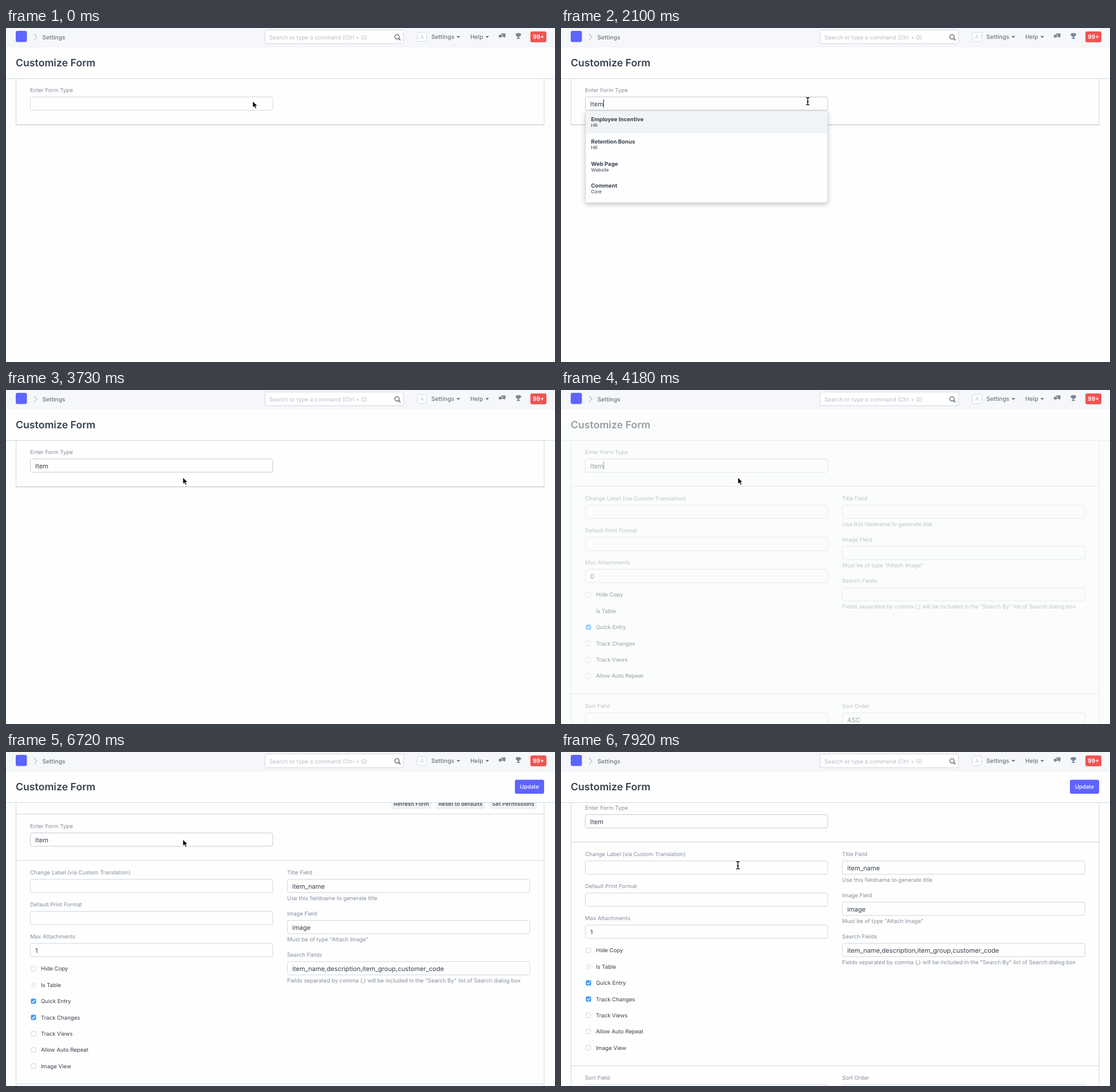
Animation of 959x584 px, one loop 8000 ms. Source, as an HTML page:

```html
<!DOCTYPE html>
<html lang="en">
<head>
<meta charset="utf-8">
<title>Customize Form</title>
<style>
  html, body { margin: 0; width: 100%; height: 100%; overflow: hidden; background: #fefefe; }
  svg { display: block; width: 959px; height: 584px; }
  text { font-family: Inter, sans-serif; white-space: pre; text-rendering: geometricPrecision; }
  .menu { filter: drop-shadow(0 3px 4px rgba(0, 0, 0, .2)); }
</style>
</head>
<body>
<svg id="stage" viewBox="0 0 959 584"></svg>
<script>
const LOOP = 8000, STEP = 146;
const FOCUS = 150, OPEN_MENU = 1200, TYPE = 1350, RESULTS = 2700, PICK = 3730;
const FREEZE = 4030, FROZEN = 4180, LOAD = 5680, SCROLL = 6570, LEAVE = 7470;
const MUTED = '#838f9c', DARK = '#36414c', NAV = '#6c7680', LINE = '#d1d8dd', BLUE = '#3b99fc', BRAND = '#5e64ff';

const progress = (t, start, steps) =>
  Math.min(Math.max(Math.floor((t - start) / STEP) + 1, 0), steps) / steps;
const easeOut = (p, power) => 1 - (1 - p) ** power;
const easeInOut = p => p < .5 ? 2 * p * p : 1 - 2 * (1 - p) ** 2;
const blink = (t, start, period, on) => t >= start && (t - start) % period < on;

const ruler = document.createElement('canvas').getContext('2d');
const widthOf = (str, size, weight = 400) => {
  ruler.font = `${weight} ${size}px Inter, sans-serif`;
  return ruler.measureText(str).width;
};

// Text is placed by the middle of its capitals
const text = (x, y, str, size = 9.6, fill = MUTED, weight = 400) =>
  `<text x="${x}" y="${y + size * .36}" font-size="${size}" fill="${fill}" font-weight="${weight}">${str}</text>`;
const box = (x, y, w, h, fill, stroke = 'none', r = 3) =>
  `<rect x="${x}" y="${y}" width="${w}" height="${h}" rx="${r}" fill="${fill}" stroke="${stroke}"/>`;
const path = (d, fill, stroke = 'none', width = 1) =>
  `<path d="${d}" fill="${fill}" stroke="${stroke}" stroke-width="${width}"/>`;
const rule = (y, x1 = 17.5, x2 = 940, color = LINE) => path(`M${x1} ${y}H${x2}`, 'none', color);

const field = (x, y, label, value = '', help = '', stroke = LINE) =>
  text(x, y, label) + box(x + .5, y + 11.5, 423.5, 23.3, '#fefefe', stroke) +
  text(x + 9, y + 23.5, value, 11.15, DARK) + text(x, y + 45, help);

const check = (y, label, ticked, boxed = true) =>
  (boxed ? box(44, y - 4, 8, 8, '#fff', '#cfd2d5', 1) : '') +
  `<g opacity="${+ticked}">${box(43.5, y - 4.5, 9, 9, BLUE, 'none', 2)}` +
  path(`M45.5 ${y}l2 2.2 3.4-4.6`, 'none', '#fff', 1.4) + '</g>' +
  text(61, y, label, 9.6, DARK);

function navbar() {
  const dropdown = (x, label) => {
    const end = x + widthOf(label, 10.2, 500) + 4;
    return text(x, 15.3, label, 10.2, NAV, 500) + path(`M${end} 14h6.4l-3.2 3.4z`, NAV);
  };
  return box(0, 0, 959, 33, '#f5f7fa', 'none', 0) + rule(33, 0, 959, '#eceff3') +
    box(17, 5, 19.5, 19.5, BRAND) +
    path('M49 10.5l5 5.3-5 5.3', 'none', '#b4bdc6', 1.2) +
    text(63.5, 16, 'Settings', 10.2, NAV, 500) +
    box(452.5, 3.5, 242, 24, '#fff', LINE) +
    text(460, 16, 'Search or type a command (Ctrl + G)', 9.8, '#b5bdc6') +
    '<circle cx="683" cy="15.5" r="3.8" fill="none" stroke="#555f69" stroke-width="1.3"/>' +
    path('M685.8 18.3l3.2 3.2', 'none', '#555f69', 1.7) +
    box(718.5, 7.5, 16, 16, '#fff', LINE) + text(723.2, 15.7, 'A', 10, '#c5ccd3') +
    dropdown(743, 'Settings') + dropdown(811, 'Help') +
    path('M864.5 9.5h8v6h-1v2l-2-2h-5z', '#7b8794') +
    path('M860.5 11.5h6.5v5h-3l-2 2v-2h-1.5z', '#7b8794', '#f5f7fa', .8) +
    path('M892 9h6v1h2q0 4-4 5.5v2h2v1.5h-6v-1.5h2v-2q-4-1.500-4-5.500h2z', '#7b8794') +
    box(916, 6, 28, 19, '#f15454') + text(920.3, 15.5, '99+', 10.2, '#fff', 600);
}

function header(loaded) {
  return box(0, 33, 959, 55.5, '#fefefe', 'none', 0) + rule(88.5, 0, 959) +
    text(17, 60.8, 'Customize Form', 17.7, DARK, 600) +
    (loaded ? box(889, 48.5, 51, 24.5, BRAND) + text(897.7, 60.8, 'Update', 9.6, '#fff', 500) : '');
}

function toolbar() {
  let right = 927, out = rule(87.5);
  for (const label of ['Set Permissions', 'Reset to defaults', 'Refresh Form']) {
    const w = widthOf(label, 9.6, 500) + 8.6;
    out += box(right - w, 61, w, 18, '#eff2f5') + text(right - w + 4.3, 70, label, 9.6, DARK, 500);
    right -= w + 8;
  }
  return out;
}

function details(t, loaded) {
  const left = ['Change Label (via Custom Translation)', 'Default Print Format', 'Max Attachments'];
  const right = [
    ['Title Field', 'item_name', 'Use this fieldname to generate title'],
    ['Image Field', 'image', 'Must be of type "Attach Image"'],
    ['Search Fields', 'item_name,description,item_group,customer_code',
      'Fields separated by comma (,) will be included in the "Search By" list of Search dialog box']
  ];
  const checks = ['Hide Copy', 'Is Table', 'Quick Entry', 'Track Changes', 'Track Views', 'Allow Auto Repeat'];
  if (loaded) checks.push('Image View');
  const ticks = { 'Quick Entry': 1, 'Track Changes': Math.sqrt(progress(t, LOAD, 2)) };
  const sortY = loaded ? 581 : 553;

  return rule(168.5) +
    left.map((label, i) => field(42, 190 + i * 56, label, i < 2 ? '' : +loaded)).join('') +
    right.map(([label, value, help], i) => field(491, 190 + i * 72, label, loaded ? value : '', help)).join('') +
    (loaded ? box(43.5, 381.8, 9, 9, '#f1f2f3', 'none', 2) : '') +
    checks.map((label, i) => check(358 + i * 28.35, label, ticks[label] || 0, label !== 'Is Table')).join('') +
    rule(sortY - 21.5) + field(42, sortY, 'Sort Field') + field(491, sortY, 'Sort Order', 'ASC');
}

function form(t, typed, lastKey, opened, loaded) {
  const shift = loaded ? 35 - Math.floor(46 * easeInOut(progress(t, SCROLL, 5))) : 0;
  const caret = loaded ? blink(t, LOAD + 150, 1640, 400) : blink(t, lastKey, 1040, 500);
  return `<g transform="translate(0 ${shift})">` +
    box(17.5, 20.5, 922.5, opened ? 900 : 148.5, '#fefefe', LINE, 0) +
    (opened ? details(t, loaded) : rule(169.5, 17, 940.5, '#c6cacd')) +
    (loaded ? toolbar() : '') +
    field(42, 109, 'Enter Form Type', typed, '', t < OPEN_MENU ? LINE : '#c3cbd4') +
    (caret ? path(`M${51.5 + widthOf(typed, 11.15)} 125v14`, 'none', '#222') : '') + '</g>';
}

function menu(t) {
  if (t < OPEN_MENU || t >= PICK) return '';
  const items = t < RESULTS
    ? [['Employee Incentive', 'HR'], ['Retention Bonus', 'HR'], ['Web Page', 'Website'], ['Comment', 'Core']]
    : ['Item', 'Item Manufacturer', 'Item Price', 'Item Variant Attribute'].map(name => [name, 'Stock']);
  return `<g class="menu">${box(42.5, 145, 423.5, 160.5, '#fefefe', LINE)}</g>` +
    box(43, 145.5, 422.5, 38.5, '#f0f4f7', 'none', 0) +
    items.map(([name, group], i) =>
      text(52.5, 159.3 + i * 38.9, name, 9.6, DARK, 700) +
      text(52.5, 169.8 + i * 38.9, group, 8.2, DARK)).join('');
}

function pointer(t) {
  const p = progress(t, RESULTS, 8);
  const x = 431 - 122 * easeOut(p, 5);
  const y = 128 + 25 * easeOut(p, 1.25) + 45 * progress(t, LEAVE, 4);
  const overField = t >= FOCUS && (y < 145 || y > 177);
  const ibeam = 'M-3-6.5q2.5 0 3 1.3 .5-1.3 3-1.3M0-5.5v11M-3 6.5q2.5 0 3-1.3 .5 1.3 3 1.3M-1.5 1h3';
  const arrow = 'M0 0V11.3L2.6 8.9 4.5 13 6.5 12.1 4.7 8.2H8.3Z';
  const shape = overField
    ? path(ibeam, 'none', '#fff', 2.6) + path(ibeam, 'none', '#000', 1.3)
    : path(arrow, '#000', '#fff', .8);
  return `<g transform="translate(${x} ${y})">${shape}</g>`;
}

function scene(now) {
  // The screen stands still while the form is being fetched
  const t = now > FROZEN && now < LOAD ? FROZEN : now;
  const opened = t >= FREEZE, loaded = t >= LOAD;
  // Keys come in two quick pairs
  const keys = [0, 1, 2, 3].map(i => TYPE + 150 * (i % 2) + 600 * (i >> 1)).filter(time => t >= time);
  const lastKey = keys.at(-1) || FOCUS;
  const veil = loaded ? 0 : .5 * progress(t, FREEZE, 2);
  return form(t, 'Item'.slice(0, keys.length), lastKey, opened, loaded) + header(loaded) +
    `<rect y="50" width="959" height="534" fill="#fafcfc" opacity="${veil}"/>` +
    navbar() + menu(t) + pointer(t);
}

const stage = document.getElementById('stage');
let shown = '';
function draw() {
  const next = scene(performance.now() % LOOP);
  if (next !== shown) stage.innerHTML = shown = next;
  requestAnimationFrame(draw);
}
draw();
</script>
</body>
</html>
```
